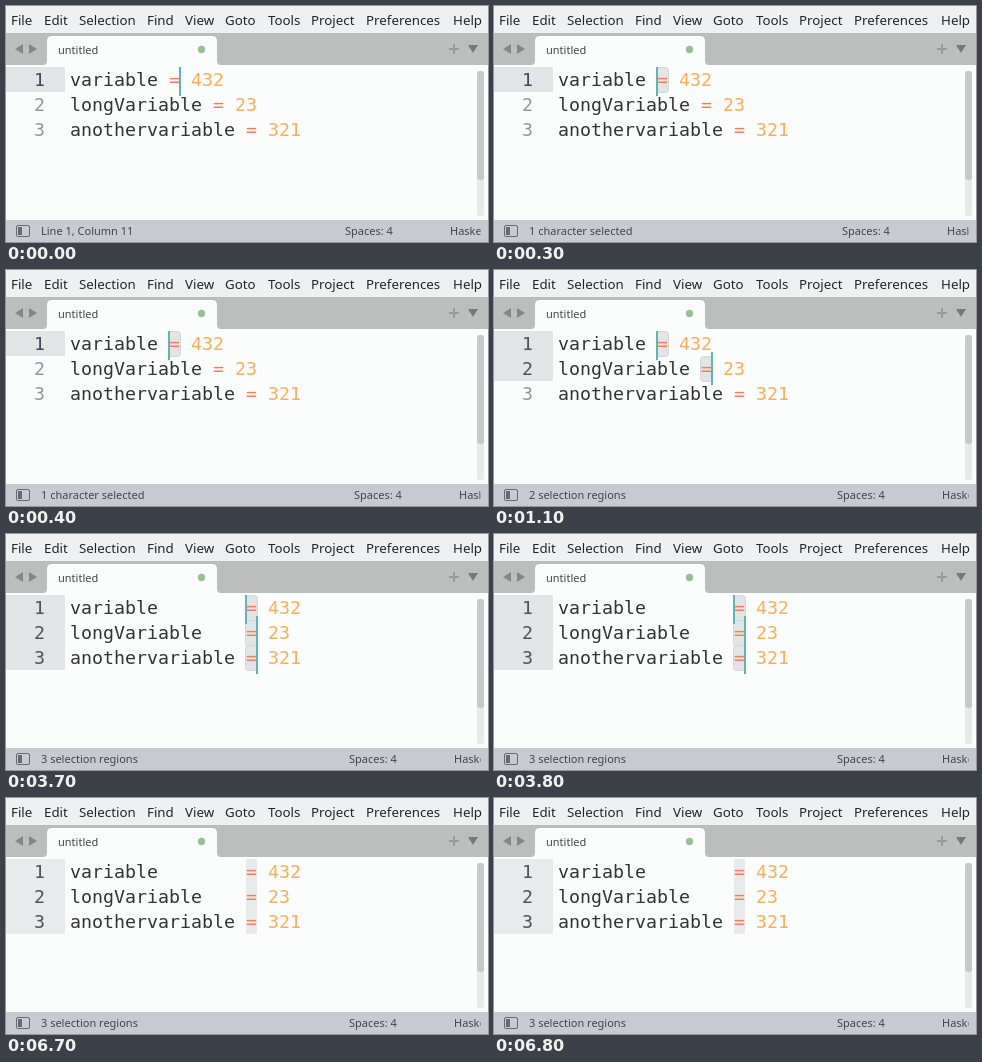
An HTML page for the animation above (7.8 s loop, 482 by 236 pixels).

```html
<!DOCTYPE html>
<html lang="en">
<head>
<meta charset="utf-8">
<title>Aligning assignments</title>
<style>
  html, body { margin: 0; width: 100%; height: 100%; overflow: hidden; background: #fbfdfd; }
  svg { display: block; width: 482px; height: 236px; }
  text { white-space: pre; }
  .menu { font: 13.33px "Noto Sans", sans-serif; fill: #232629; }
  .small { font: 11px "Noto Sans", sans-serif; fill: #40464c; }
  .code { font: 18.27px "DejaVu Sans Mono", monospace; fill: #333; }
  .code .operator { fill: #f97b58; }
  .code .number { fill: #f9ae58; }
</style>
</head>
<body>
<svg viewBox="0 0 482 236">
  <clipPath id="statusClip"><rect y="214" width="474.5" height="22"/></clipPath>
  <rect width="482" height="236" fill="#fbfdfd"/>
  <rect width="482" height="28" fill="#eff0f1"/>
  <g id="menu" class="menu"></g>

  <rect y="27" width="482" height="32" fill="#bcbebd"/>
  <path d="M37 59q4 0 4-4V35q0-5 5-5H206q5 0 5 5V55q0 4 4 4z" fill="#fbfdfd"/>
  <path d="M17 38v10l-8-5zM23 38v10l8-5z" fill="#858787"/>
  <path d="M443 43h10M448 38v10" stroke="#999b9b" stroke-width="2"/>
  <path d="M462 39h10l-5 8z" fill="#777979"/>
  <text class="small" x="52" y="48">untitled</text>
  <circle cx="195.5" cy="43.5" r="3.7" fill="#99c199"/>

  <g id="editor"></g>

  <rect x="471" y="65" width="7" height="145" rx="3" fill="#e8eaea"/>
  <rect x="471" y="65" width="7" height="109" rx="3" fill="#c8caca"/>

  <rect y="214" width="482" height="22" fill="#c7cbd1"/>
  <rect x="10.5" y="219.5" width="13" height="11" rx="1.5" fill="none" stroke="#656a70"/>
  <rect x="12" y="221" width="4" height="8" fill="#656a70"/>
  <g class="small" clip-path="url(#statusClip)">
    <text id="message" x="35" y="229"></text>
    <text id="spaces" y="229">Spaces: 4</text>
    <text id="syntax" y="229">Haskell</text>
  </g>
</svg>
<script>
const LOOP = 7800, CHAR = 11, LEFT = 64, TOP = 61, LINE = 25;
const byId = id => document.getElementById(id);

const menuItems = { File: 5, Edit: 38, Selection: 73, Find: 141, View: 179,
  Goto: 219, Tools: 262, Project: 305, Preferences: 360, Help: 447 };
byId("menu").innerHTML = Object.entries(menuItems)
  .map(([label, x]) => `<text x="${x}" y="19">${label}</text>`).join("");

const lines = [["variable", 432], ["longVariable", 23], ["anothervariable", 321]];

// Each state holds until the next one starts.
const states = [
  { at: 0, selected: 0, message: "Line 1, Column 11", right: 339 },
  { at: 300, selected: 1, message: "1 character selected", right: 348 },
  { at: 1100, selected: 2, message: "2 selection regions", right: 343 },
  { at: 1400, selected: 3, message: "3 selection regions", right: 343 },
  { at: 3700, selected: 3, message: "3 selection regions", right: 343, aligned: true },
  { at: 6700, selected: 3, message: "3 selection regions", right: 343, aligned: true, idle: true }
];

const rect = (x, y, w, h, fill, extra = "") =>
  `<rect x="${x}" y="${y}" width="${w}" height="${h}" fill="${fill}" ${extra}/>`;
const text = (x, y, content, attributes = "") =>
  `<text x="${x}" y="${y}" ${attributes}>${content}</text>`;

function drawLine([name, value], row, { selected, aligned, idle }) {
  const y = TOP + row * LINE, baseline = y + 19;
  const x = LEFT + ((aligned ? 15 : name.length) + 1) * CHAR;
  const active = row < Math.max(selected, 1);
  const numberColor = !active ? "#929799" : selected < 2 ? "#46475f" : "#4c535b";
  let back = "", caret = "";

  if (active) back += rect(0, y, 59, LINE, idle ? "#e8ebeb" : "#e1e5e5");
  if (row < selected) {
    back += idle
      ? rect(x, y, CHAR, LINE, "#e8ebeb")
      : rect(x - .5, y + .5, CHAR + 1, LINE, "#e1e5e5", 'rx="3" stroke="#d3d8d8"');
  }
  if (active && !idle) {
    const caretX = x + (row || !selected ? CHAR - 1 : -1);
    const rise = row ? 4 : 0;
    caret = rect(caretX, y - rise, 2, 29 + rise, "#5fb4b4");
  }
  const front = text(28, baseline, row + 1, `style="fill:${numberColor}"`)
    + text(LEFT, baseline, name)
    + text(x, baseline, "=", 'class="operator"')
    + text(x + 2 * CHAR, baseline, value, 'class="number"');
  return { back, front, caret };
}

function show(state) {
  const rows = lines.map((line, row) => drawLine(line, row, state));
  byId("editor").innerHTML = ["back", "front", "caret"]
    .map(layer => `<g class="code">${rows.map(row => row[layer]).join("")}</g>`).join("");
  byId("message").textContent = state.message;
  byId("spaces").setAttribute("x", state.right);
  byId("syntax").setAttribute("x", state.right + 105);
}

let shown;
function frame() {
  const time = performance.now() % LOOP;
  const state = states.findLast(({ at }) => at <= time);
  if (state !== shown) show(shown = state);
  requestAnimationFrame(frame);
}
frame();
</script>
</body>
</html>
```
